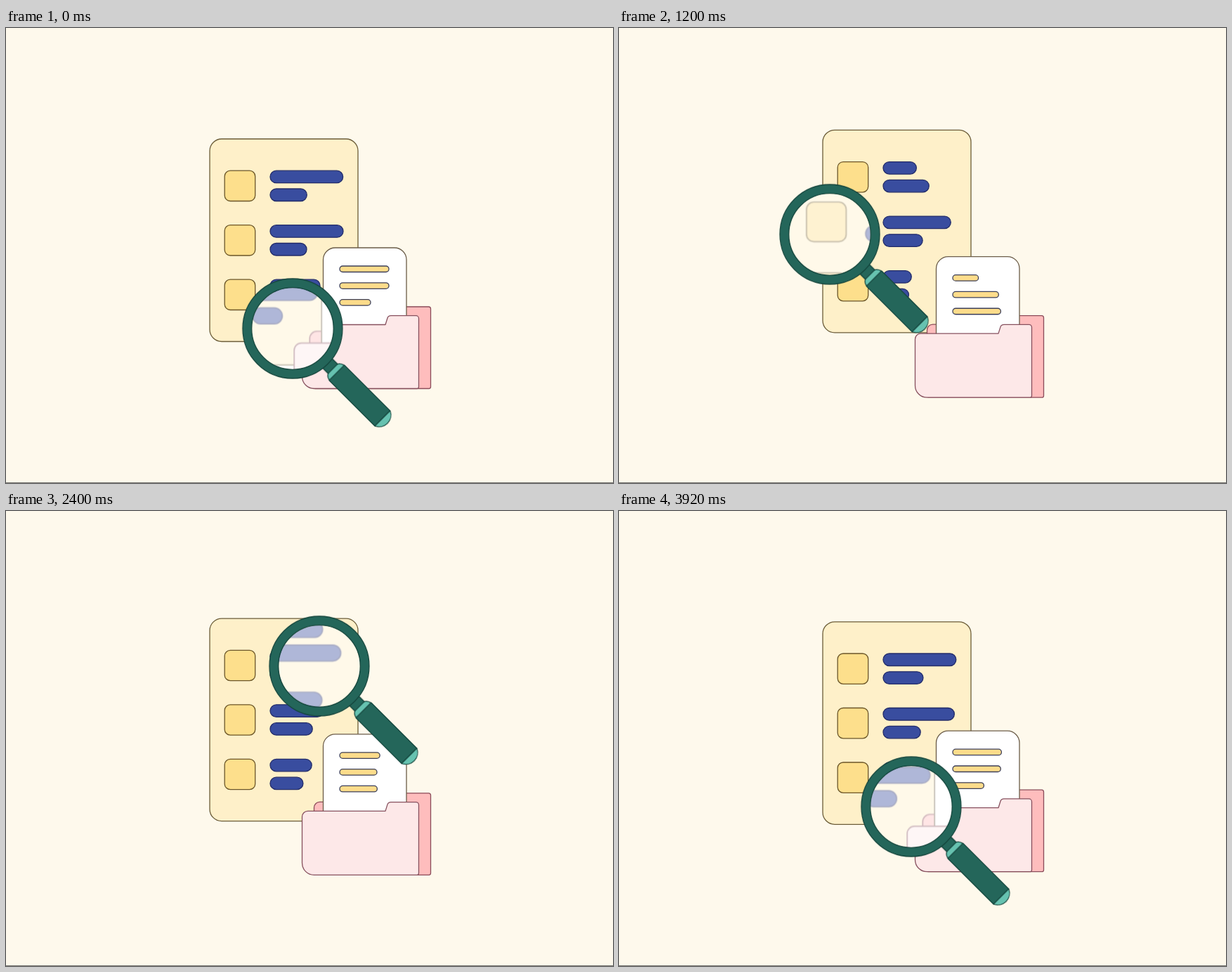
Write an HTML page that moves like this. It is 864 by 648 pixels and loops after 4000 ms.

```html
<!DOCTYPE html>
<html lang="en">
<head>
<meta charset="utf-8">
<title>Document search</title>
<style>
html, body { margin: 0; width: 100%; height: 100%; overflow: hidden; background: #fef9ec; }
svg { display: block; width: 864px; height: 648px; }
.page { fill: #fef0c9; stroke: #6b5c38; }
.tile { fill: #fddf8c; stroke: #6b5628; }
.bar { fill: #394d9f; stroke: #232c69; }
.card { fill: #fff; stroke: #6b5c48; }
.line { fill: #fddc8b; stroke: #3c3f58; }
.back { fill: #febdbd; stroke: #8b4c5a; }
.front { fill: #fde8e8; stroke: #86505e; }
.dark { fill: #24665a; stroke: #15463d; }
.mint { fill: #66c2b0; stroke: #15463d; }
</style>
</head>
<body>
<svg viewBox="0 0 864 648" stroke-width="1.3" stroke-linejoin="round">
  <defs>
    <clipPath id="glass"><circle id="hole" r="58"/></clipPath>
  </defs>
  <g id="scene">
    <g id="sheet">
      <rect class="page" x="290" y="158" width="211" height="288.5" rx="17"/>
    </g>
    <g id="folder">
      <path class="back" d="M438.500 500V417.500a8 8 0 0 1 8-8H540L546 397H601.500a3 3 0 0 1 3 3V511a2.500 2.500 0 0 1-2.500 2.500H440z"/>
      <path class="card" d="M451.500 440V330a17 17 0 0 1 17-17H553a17 17 0 0 1 17 17V440z"/>
      <g id="lines"></g>
      <path class="front" d="M421.500 430.500a8 8 0 0 1 8-8H540L543 413Q544.200 409.700 548 409.700H583.500a4 4 0 0 1 4 4V511a2.500 2.500 0 0 1-2.500 2.500H438.500a17 17 0 0 1-17-17z"/>
    </g>
  </g>
  <g clip-path="url(#glass)">
    <rect width="864" height="648" fill="#fff"/>
    <use href="#scene" opacity=".4" transform="matrix(1.3 0 0 1.3 -137.8 -100.6)"/>
  </g>
  <g id="lens">
    <g transform="rotate(45)">
      <rect class="dark" x="68" y="-9.500" width="18" height="19"/>
      <path class="mint" d="M90-14.500H87Q81-12 81-8V8Q81 12 87 14.500H90z"/>
      <rect class="dark" x="89" y="-15.300" width="92" height="30.600"/>
      <path class="mint" d="M181-15.500A17 17 0 0 1 181 15.500z"/>
    </g>
    <path class="dark" fill-rule="evenodd" d="M-71 0a71 71 0 1 1 142 0a71 71 0 1 1-142 0zM-58.300 0a58.300 58.300 0 1 0 116.600 0a58.300 58.300 0 1 0-116.600 0z"/>
  </g>
  <rect y="647" width="864" height="1" fill="#777570"/>
</svg>
<script>
const LOOP = 4000;
const $ = id => document.getElementById(id);
const sheet = $('sheet'), folder = $('folder'), lines = $('lines');
const lens = $('lens'), hole = $('hole');

function addRect(parent, cls, x, y, w, h, r) {
  const el = document.createElementNS('http://www.w3.org/2000/svg', 'rect');
  const attrs = { class: cls, x, y, width: w, height: h, rx: r };
  for (const key in attrs) el.setAttribute(key, attrs[key]);
  parent.append(el);
  return el;
}

for (let row = 0; row < 3; row++) addRect(sheet, 'tile', 311.2, 203.2 + row * 77.5, 43.5, 43.3, 8);

// width at rest, cycles per loop, swing of each cycle, time shift
const swings = [
  { w: 104, n: 2, swing: [-66], shift: 45 },
  { w: 52, n: 4, swing: [48, 48, 52, 48], shift: -25 },
  { w: 104, n: 3, swing: [-82, -82, -77] },
  { w: 52, n: 3, swing: [44, 24, 35] },
  { w: 71, n: 2, swing: [-34] },
  { w: 32.5, n: 3, swing: [42] },
  { w: 70, n: 2, swing: [-37] },
  { w: 70, n: 3, swing: [-49.5] },
  { w: 44, n: 2, swing: [27] }
];

swings.forEach((s, i) => {
  const row = i >> 1;
  s.el = i < 6
    ? addRect(sheet, 'bar', 376, 203.2 + row * 77.5 + (i % 2) * 25.8, s.w, 17.5, 8.75)
    : addRect(lines, 'line', 475, 339 + (i - 6) * 23.8, s.w, 8.5, 4.25);
});

// lens path: time, x, y
const path = [
  [0, 408, 428], [80, 397, 424], [560, 332.5, 378], [880, 300.5, 347],
  [1020, 293, 325], [1120, 295.5, 308], [1520, 331, 239], [1680, 346, 216],
  [1920, 382, 187.5], [2020, 396, 182.7], [2240, 424, 200.5], [2560, 467, 244],
  [2880, 502.5, 291.5], [3040, 509.5, 315], [3360, 484, 361],
  [3520, 463.5, 381], [3920, 416, 421]
];

function key(i) {
  const n = path.length, turn = Math.floor(i / n);
  const [t, x, y] = path[i - turn * n];
  return [t + turn * LOOP, x, y];
}

function lensAt(t) {
  let i = path.length - 1;
  while (path[i][0] > t) i--;
  const [a, b, c, d] = [i - 1, i, i + 1, i + 2].map(key);
  const span = c[0] - b[0], u = (t - b[0]) / span;
  // cubic Hermite; tangents weigh each side by its own duration
  const slope = (p, q, r, k) => {
    const h1 = q[0] - p[0], h2 = r[0] - q[0];
    return ((q[k] - p[k]) / h1 * h2 + (r[k] - q[k]) / h2 * h1) / (h1 + h2);
  };
  return [1, 2].map(k => {
    const m0 = slope(a, b, c, k) * span, m1 = slope(b, c, d, k) * span;
    const diff = c[k] - b[k];
    return b[k] + u * (m0 + u * (3 * diff - 2 * m0 - m1 + u * (m0 + m1 - 2 * diff)));
  });
}

const wave = p => (1 - Math.cos(2 * Math.PI * p)) / 2;

function draw(t) {
  const bob = 14 * wave(t / 2000);
  sheet.setAttribute('transform', `translate(0 ${-bob})`);
  folder.setAttribute('transform', `translate(0 ${bob})`);
  for (const { el, w, n, swing, shift = 0 } of swings) {
    const p = (t + shift + LOOP) / LOOP * n;
    const cycle = Math.floor(p) % n % swing.length;
    el.setAttribute('width', w + swing[cycle] * wave(p));
  }
  const [x, y] = lensAt(t);
  lens.setAttribute('transform', `translate(${x} ${y})`);
  hole.setAttribute('cx', x);
  hole.setAttribute('cy', y);
}

const start = performance.now();
function tick() {
  draw((performance.now() - start) % LOOP);
  requestAnimationFrame(tick);
}
draw(0);
requestAnimationFrame(tick);
</script>
</body>
</html>
```
